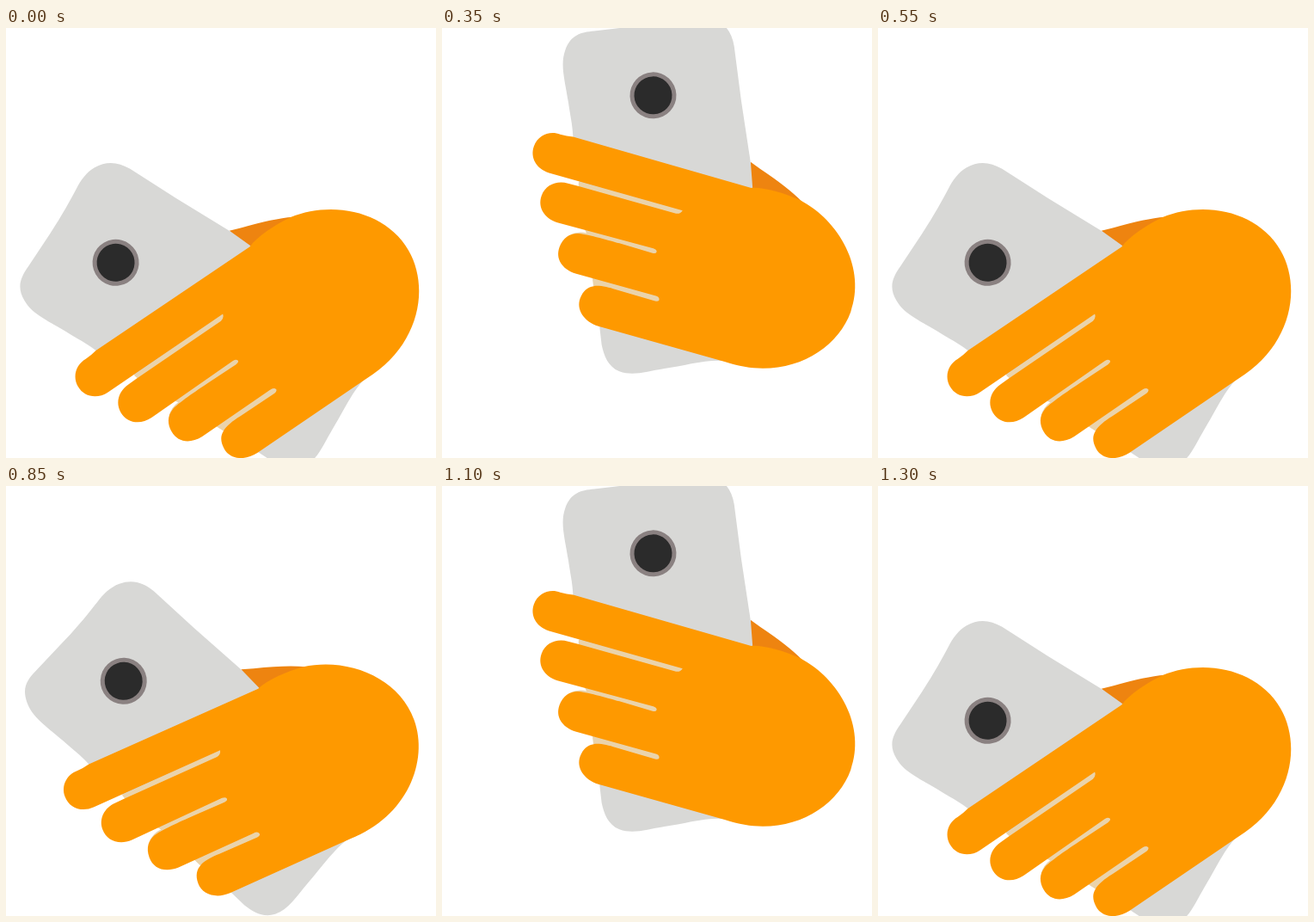
These frames come from a looping animation (500 px wide and 500 px high, 2.15 s). An HTML page with a canvas:

```html
<!DOCTYPE html>
<html lang="en">
<head>
<meta charset="utf-8">
<title>Hand shaking a phone</title>
<style>
  html, body { margin: 0; width: 100%; height: 100%; overflow: hidden; background: #fff; }
  canvas { display: block; width: 500px; height: 500px; }
</style>
</head>
<body>
<canvas id="stage" width="500" height="500"></canvas>
<script>
const ctx = document.getElementById('stage').getContext('2d');

const LOOP = 2150;
const STEP = 50;
const SHAKES = [100, 850];
const LIFTS = [0, 10, 20, 30, 50, 60]; // degrees above the resting pose
const REST = -30;
const WRIST = { x: 395, y: 302 };

// All shapes are drawn with the hand nearly level.
const phone = new Path2D(`M107 220 C101 206 96 199 88 184 C74 159 64 146 64 128
  C64 110 73 103 88 96 L130 75 C152 64 168 54 181 46 C190 40 201 35 212 35
  C228 35 239 43 247 57 L276 113 L312 179 L326 210 L365 404
  C344 408 320 426 299 437 C281 447 268 458 251 458
  C236 457 228 447 221 436 L212 418 Z`);

const thumb = new Path2D('M311 177 Q318 179 325 181 Q362 190 383 200 L340 215 L320 206 Z');

const gaps = new Path2D(`M131 267 L257 256 L253 264 L133 273 Z
  M157 317 L246 308 V317 L180 330 L143 328 Q150 321 160 320 Z
  M184 366 L268 359 V368 L200 385 L189 376 Z`);

const hand = new Path2D(`M107 220 L322 205 C336 199 360 197.5 380 199
  C432 206 480 248 480 301 C480 352 434 404 363 405.5
  L210 417 C193 418 179 408 179 394 C179 384 183 378 189 375
  C193 372 205 370 214 370 L262 367 Q266 366 266 364 Q265 360 259 361
  L164 368.5 C147 369 136 360 136 346 C136 334 142 327 150 324
  C158 321 185 319 200 318 L240 315.5 Q245 315 244 312 Q243 310 239 310
  L124 320 C108 321 96 311 96 297 C96 283 107 274 120 273
  L131 272 L250 263 Q255 262 256 257
  L95 269 C80 270 68 260 68 246 C68 232 79 222.5 92 222.5 Q100 222 107 220 Z`);

function fill(path, color) {
  ctx.fillStyle = color;
  ctx.fill(path);
}

function disc(x, y, r, color) {
  const path = new Path2D();
  path.arc(x, y, r, 0, Math.PI * 2);
  fill(path, color);
}

// Each shake rises in five steps and returns the same way.
function liftAt(t) {
  for (const start of SHAKES) {
    const k = Math.floor((t - start) / STEP) + 1;
    if (k > 0 && k < 10) return LIFTS[Math.min(k, 10 - k)];
  }
  return 0;
}

function draw(t) {
  ctx.fillStyle = '#fff';
  ctx.fillRect(0, 0, 500, 500);
  ctx.save();
  ctx.translate(WRIST.x, WRIST.y);
  ctx.rotate((REST + liftAt(t)) * Math.PI / 180);
  ctx.translate(-WRIST.x, -WRIST.y);
  fill(thumb, '#ee8410');
  fill(phone, '#d8d8d6');
  disc(178, 143, 27, '#8a8181');
  disc(178, 143, 22, '#2b2b2b');
  fill(gaps, '#ead3ab');
  fill(hand, '#fe9900');
  ctx.restore();
}

const begin = performance.now();

function tick() {
  draw((performance.now() - begin) % LOOP);
  requestAnimationFrame(tick);
}
tick();
</script>
</body>
</html>
```
